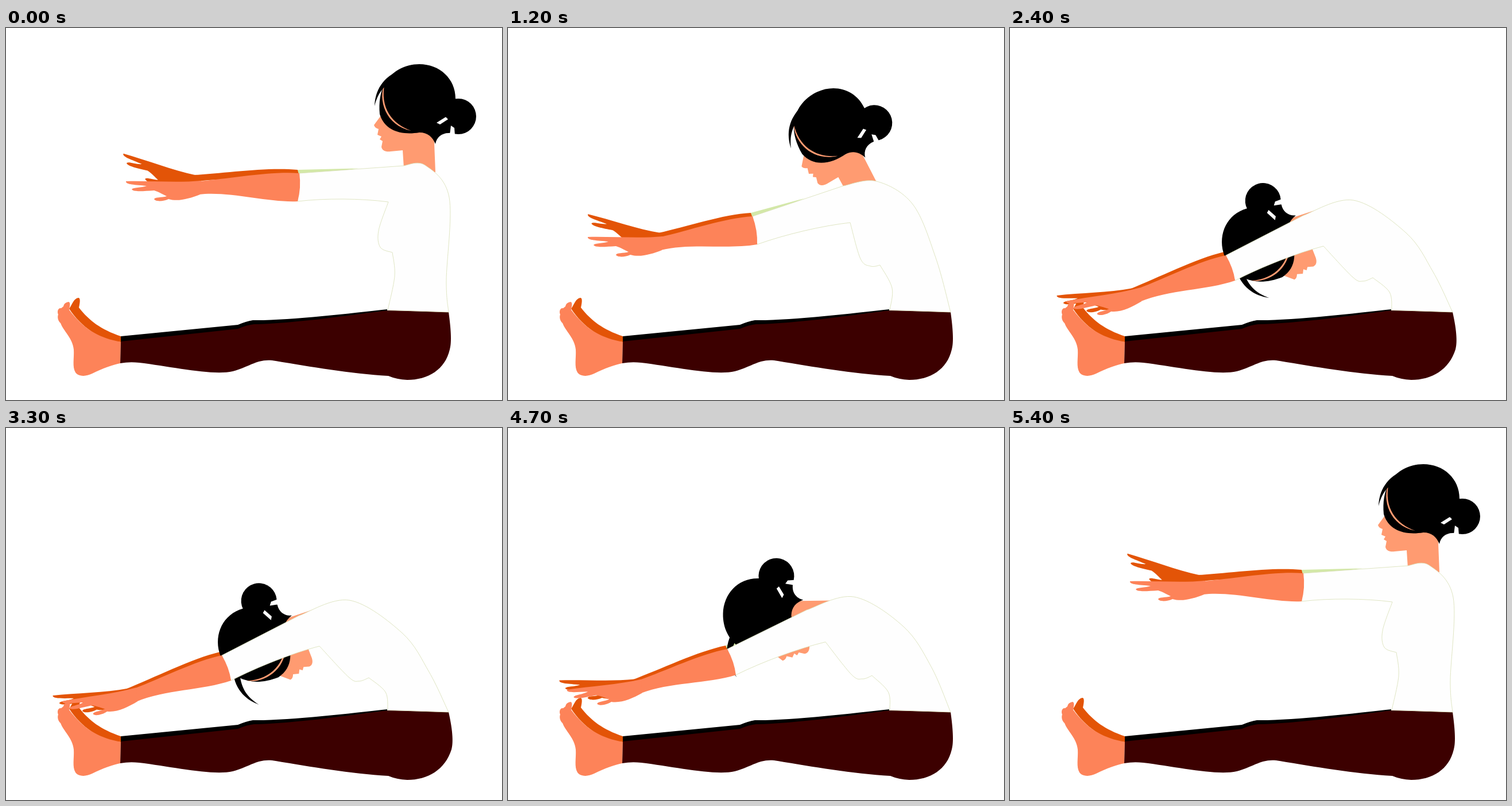
Recreate the animation shown at these times as an HTML page with a canvas. Size 864 px wide and 648 px high, loop 6400 ms.

```html
<!DOCTYPE html>
<html lang="en">
<head>
<meta charset="utf-8">
<title>Seated forward bend</title>
<style>
html, body { margin: 0; width: 100%; height: 100%; overflow: hidden; background: #fff; }
canvas { display: block; }
</style>
</head>
<body>
<canvas id="stage" width="864" height="648"></canvas>
<script>
const ctx = document.getElementById('stage').getContext('2d');
const SKIN = '#fd8359', SHADE = '#e35407', FACE = '#ff9b71', SHIRT = '#fefefe', LEAF = '#d3e8a8';
const STEP = 100, BEND_START = 1000, BEND_STEPS = 24, RISE_START = 4300, RISE_STEPS = 12, LOOP = 6400;
const HIP = [771, 495], HEM = [665, 491];

// Joints as x, y and, where a rigid part hangs on them, an angle: upright, leaning, folded.
const JOINTS = {
  neck: [[720, 240, 0], [613, 272, -25], [542, 343, -106]],
  nearWrist: [[336, 267, 0], [266, 364, 0], [223, 454, -10]],
  farWrist: [[326, 256, 17], [262, 357, 15], [208, 455, -5]],
  cuffTop: [[511, 253], [426, 328], [376, 396]],
  cuffBottom: [[508, 302], [434, 377], [392, 440]],
  collar: [[692, 240], [584, 275], [510, 327]],
  nape: [[730, 239], [642, 267], [598, 300]],
  upperBack: [[772, 295], [705, 307], [690, 357]],
  lowerBack: [[767, 440], [745, 400], [737, 425]],
  belly: [[677, 432], [669, 453], [661, 460]],
  fold: [[673, 391], [648, 413], [632, 435]],
  bust: [[652, 382], [632, 415], [615, 441]],
  chest: [[649, 353], [614, 402], [597, 434]],
  armpit: [[666, 303], [596, 339], [546, 380]]
};

const path = d => new Path2D(d);
const hand = path('M340 266C300 270 250 266 209 267C208 273 225 273 245 275C235 279 222 277 219 281C222 286 240 284 258 283C268 286 275 291 280 293C270 296 260 294 258 298C260 303 275 302 283 298C300 303 320 297 338 290Z');
const face = path('M656 120L655 150 641 169Q642 174 649 176L647 186 654 189 651 194 656 197 654 207C655 214 662 216 670 215L691 213 693 244 720 256 748 251 745 175Z');
const hair = path('M748 202C743 190 735 182 720 182C690 187 660 180 651 150C649 130 652 110 660 97C672 75 695 63 720 63C755 63 783 88 783 123L790 170 773 183C760 182 750 190 748 202Z');
const fringe = path('M660 95C647 125 661 170 706 179C674 168 650 140 660 95Z');
const wisp = path('M690 72C655 85 643 110 642 136C648 112 660 95 690 85Z');
const hairTie = path('M750 165L766 155 770 159 756 168ZM775 170L781 174 782 187 773 186Z');
const farFoot = path('M200 537C165 525 145 510 127 487C129 478 130 470 126 470C118 471 115 482 110 489C130 520 165 545 200 547Z');
const nearFoot = path('M200 547C165 540 138 528 110 491C111 485 113 478 109 477C104 478 101 480 100 485C97 487 96 489 95 488C90 488 89 495 91 499C89 504 91 511 95 514C100 528 116 540 118 560C119 575 115 590 121 600C127 608 140 607 150 602C170 592 185 587 199 584Z');
const farLeg = path('M200 537L404 517Q418 511 430 509C490 510 600 497 664 490L664 500 200 548Z');
const nearLeg = swell => path(`M200 546L404 524Q420 517 432 516C500 515 600 500 664 492L771 495C${776 + swell} 530 ${776 + swell} 550 ${773 + swell} 560C765 595 735 613 699 613Q680 612 666 606C600 602 530 590 470 580C440 574 425 590 395 598C360 606 290 590 232 583Q215 581 199 584Z`);

// Parabola through the three values of a joint, u from 0 to 2.
const blend = ([a, b, c], u) =>
  b.map((mid, i) => mid + (u - 1) * (c[i] - a[i]) / 2 + (u - 1) ** 2 * (a[i] - 2 * mid + c[i]) / 2);
const mix = (a, b, t, lift = 0) => [a[0] + (b[0] - a[0]) * t, a[1] + (b[1] - a[1]) * t + lift];
const radians = degrees => degrees * Math.PI / 180;

function fill(shape, color) {
  ctx.fillStyle = color;
  ctx.fill(shape);
}

function place([x, y, angle], [pivotX, pivotY], draw) {
  ctx.save();
  ctx.translate(x, y);
  ctx.rotate(radians(angle));
  ctx.translate(-pivotX, -pivotY);
  draw();
  ctx.restore();
}

function polygon(...points) {
  const shape = new Path2D();
  points.forEach(p => shape.lineTo(...p));
  return shape;
}

// Smooth line through all points.
function spline(shape, ...points) {
  shape.lineTo(...points[0]);
  const point = i => points[Math.max(0, Math.min(points.length - 1, i))];
  for (let i = 0; i < points.length - 1; i++) {
    const [a, b, c, d] = [-1, 0, 1, 2].map(k => point(i + k));
    shape.bezierCurveTo(b[0] + (c[0] - a[0]) / 6, b[1] + (c[1] - a[1]) / 6,
      c[0] - (d[0] - b[0]) / 6, c[1] - (d[1] - b[1]) / 6, ...c);
  }
}

function bow(shape, from, to, startLift, endLift) {
  shape.lineTo(...from);
  shape.bezierCurveTo(...mix(from, to, .3, startLift), ...mix(from, to, .7, endLift), ...to);
}

function drawArm(top, bottom, wrist, thickness, color) {
  const [x, y, angle] = wrist, turn = radians(angle);
  const arm = new Path2D();
  bow(arm, top, [x, y], -8, 0);
  bow(arm, [x - thickness * Math.sin(turn), y + thickness * Math.cos(turn)], bottom, -10, 6);
  const edge = mix(top, bottom, .5);
  arm.quadraticCurveTo(edge[0] + 5, edge[1], ...top);
  fill(arm, color);
  place(wrist, JOINTS.nearWrist[0], () => fill(hand, color));
}

function drawHead(swing) {
  fill(face, FACE);
  fill(hair, '#000');
  ctx.beginPath();
  ctx.arc(788, 154, 31, 0, Math.PI * 2);
  ctx.fill();
  fill(fringe, FACE);
  fill(hairTie, '#fff');
  place([680, 75, swing], [680, 75], () => fill(wisp, '#000'));
}

function drawShirt(j) {
  const shirt = polygon(j.cuffTop);
  spline(shirt, j.collar, j.nape, j.upperBack, j.lowerBack, HIP);
  spline(shirt, HEM, j.belly, j.fold);
  spline(shirt, j.fold, j.bust, j.chest, j.armpit);
  bow(shirt, j.armpit, j.cuffBottom, -6, -6);
  shirt.closePath();
  fill(shirt, SHIRT);
  ctx.strokeStyle = '#d7dfb4';
  ctx.lineWidth = .8;
  ctx.stroke(shirt);
}

function drawFigure(u, swing) {
  const j = {};
  for (const name in JOINTS) j[name] = blend(JOINTS[name], u);
  const farCuff = [j.cuffTop[0] - 3, j.cuffTop[1] - 6];
  ctx.clearRect(0, 0, 864, 648);
  fill(farFoot, SHADE);
  drawArm(farCuff, mix(j.cuffTop, j.cuffBottom, .2), j.farWrist, 14, SHADE);
  fill(polygon(farCuff, mix(j.cuffTop, j.collar, .57, -1), mix(j.cuffTop, j.cuffBottom, .1)), LEAF);
  fill(nearFoot, SKIN);
  fill(farLeg, '#000');
  fill(nearLeg(Math.max(0, u - 1.9) * 30), '#3c0000');
  place(j.neck, JOINTS.neck[0], () => drawHead(swing));
  drawShirt(j);
  drawArm(j.cuffTop, j.cuffBottom, j.nearWrist, 23, SKIN);
}

function render(now) {
  const t = now % LOOP;
  const stepsSince = (start, most) => Math.max(0, Math.min(most, Math.floor((t - start) / STEP) + 1));
  const bent = stepsSince(BEND_START, BEND_STEPS), risen = stepsSince(RISE_START, RISE_STEPS);
  const step = risen ? RISE_STEPS - risen : bent;
  const progress = risen ? step / RISE_STEPS : step / BEND_STEPS;
  // The loose strand trails behind while the body rises.
  const lag = risen ? 30 * Math.sin(Math.PI * progress) ** 4 : 0;
  drawFigure(2 - 2 ** (1 - (step / 3) ** 1.5), 34 * progress + lag);
}

const began = performance.now();
function tick() {
  render(performance.now() - began);
  requestAnimationFrame(tick);
}
tick();
</script>
</body>
</html>
```
